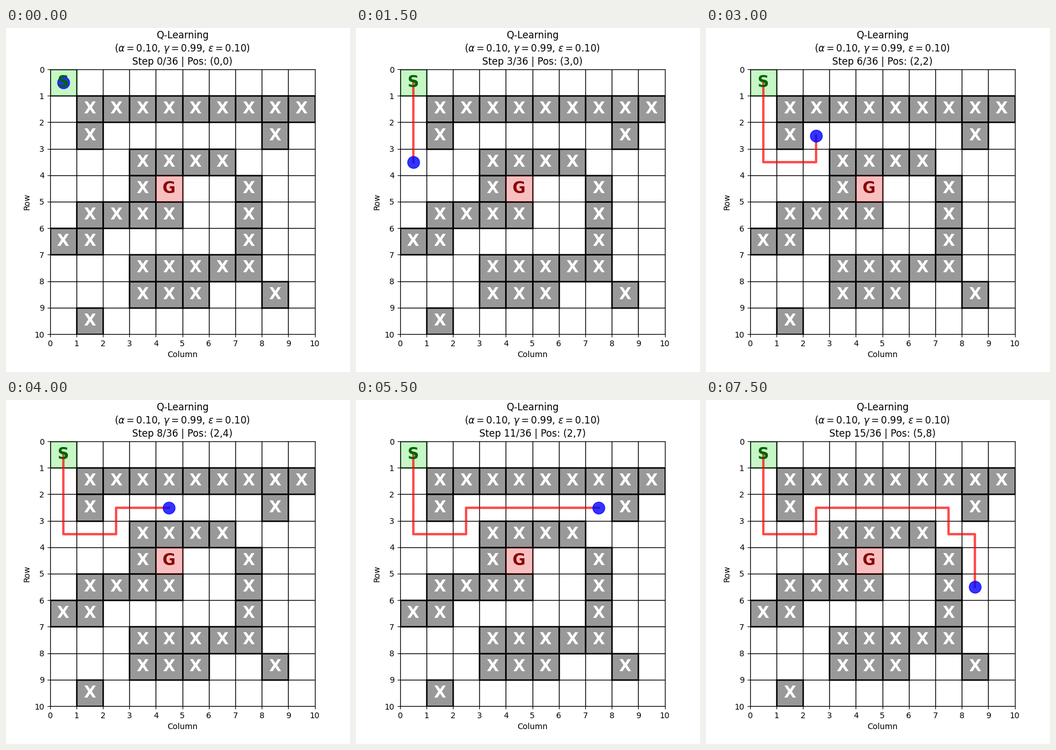
Animation, 600 px wide and 600 px high, one loop 8 s. Source, as a matplotlib script:

```python
import matplotlib.pyplot as plt
from matplotlib.animation import FuncAnimation
from matplotlib.patches import Rectangle

SIZE = 10
STEPS = 36
FRAMES = 16
WALLS = {
    1: range(1, 10),
    2: (1, 8),
    3: range(3, 7),
    4: (3, 7),
    5: (1, 2, 3, 4, 7),
    6: (0, 1, 7),
    7: range(3, 8),
    8: (3, 4, 5, 8),
    9: (1,),
}
MOVES = {"D": (1, 0), "U": (-1, 0), "R": (0, 1), "L": (0, -1)}


def walk(route, start=(0, 0)):
    cells = [start]
    for m in route:
        (r, c), (dr, dc) = cells[-1], MOVES[m]
        cells.append((r + dr, c + dc))
    return cells


def draw_cell(row, col, label, face, edge, ink, alpha):
    ax.add_patch(Rectangle((col, row), 1, 1, facecolor=face, edgecolor=edge,
                           linewidth=2, alpha=alpha))
    ax.text(col + 0.5, row + 0.5, label, ha="center", va="center",
            fontsize=20, fontweight="bold", color=ink)


path = walk("DDDRRURRRRRDRDD")

fig, ax = plt.subplots(figsize=(6, 6), dpi=100)
ax.set(xlim=(0, SIZE), ylim=(SIZE, 0), aspect="equal",
       xticks=range(SIZE + 1), yticks=range(SIZE + 1),
       xlabel="Column", ylabel="Row")
ax.grid(True, color="black", linewidth=1)

for row, cols in WALLS.items():
    for col in cols:
        draw_cell(row, col, "X", "gray", "black", "white", 0.8)
draw_cell(0, 0, "S", "lightgreen", "darkgreen", "darkgreen", 0.5)
draw_cell(4, 4, "G", "lightcoral", "darkred", "darkred", 0.5)

trail, = ax.plot([], [], color="red", linewidth=3, alpha=0.7)
agent, = ax.plot([], [], "o", color="blue", markersize=15, alpha=0.8)


def update(step):
    xs = [c + 0.5 for _, c in path[:step + 1]]
    ys = [r + 0.5 for r, _ in path[:step + 1]]
    trail.set_data(xs, ys)
    agent.set_data(xs[-1:], ys[-1:])
    row, col = path[step]
    ax.set_title("Q-Learning\n"
                 r"($\alpha=0.10$, $\gamma=0.99$, $\varepsilon=0.10$)" "\n"
                 f"Step {step}/{STEPS} | Pos: ({row},{col})")
    return trail, agent


anim = FuncAnimation(fig, update, frames=FRAMES, init_func=lambda: update(0),
                     interval=500, repeat=True, repeat_delay=0)
plt.show()
```
